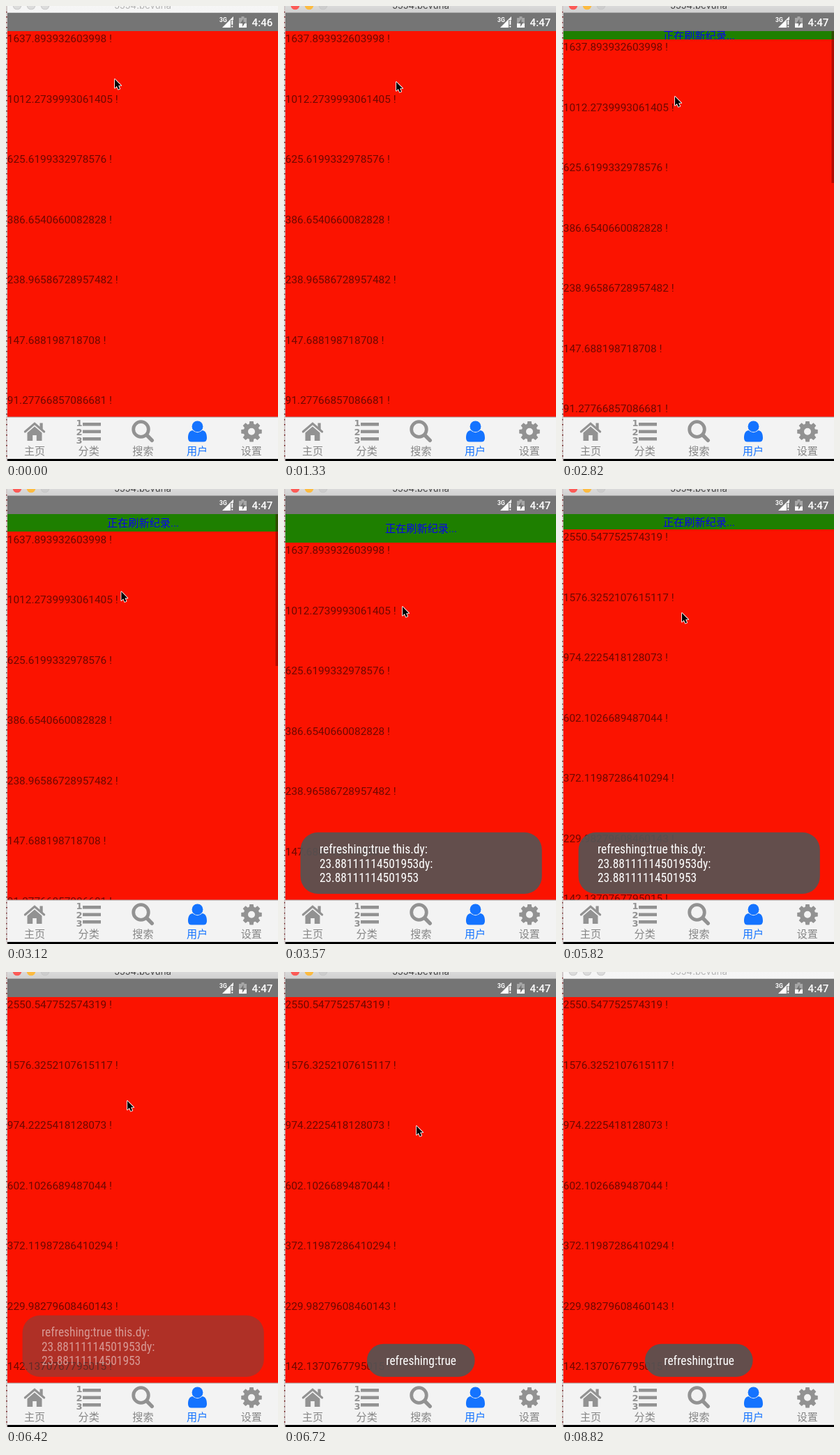
Animation of 390x653 px, one loop 8870 ms. Source, as an HTML page with a canvas:

```html
<!DOCTYPE html>
<html lang="zh">
<head>
<meta charset="utf-8">
<title>Pull to refresh</title>
<style>
html, body { margin: 0; width: 100%; height: 100%; overflow: hidden; background: #fff; }
canvas { display: block; width: 390px; height: 653px; }
</style>
</head>
<body>
<canvas id="stage" width="390" height="653"></canvas>
<script>
const ctx = document.getElementById('stage').getContext('2d');
const LOOP = 8870;
const TOP = 36, BOTTOM = 590, ROW = 86.5;
const RED = '#fb1300', GRAY = '#929292', BLUE = '#1473ff';
const SANS = 'Roboto, sans-serif';
const CJK = '"Noto Sans CJK SC", "Noto Sans CJK", sans-serif';

const oldRows = ['1637.893932603998', '1012.2739993061405', '625.6199332978576',
  '386.6540660082828', '238.96586728957482', '147.688198718708', '91.27766857086681'];
const newRows = ['2550.547752574319', '1576.3252107615117', '974.2225418128073',
  '602.1026689487044', '372.11987286410294', '229.98279608460143', '142.1370767795015'];

// Keys are [step, value, ...], joined by straight lines.
const pointer = [
  [0, 155, 104], [1, 157, 95], [2, 158, 86], [5, 158, 86], [9, 160, 108], [13, 160, 120],
  [17, 160, 123], [19, 161, 129], [22, 166, 155], [24, 169, 168], [26, 171, 177],
  [42, 171, 177], [43, 173, 184], [45, 189, 220], [47, 230, 370], [49, 282, 575],
  [51, 308, 628], [53, 326, 675]
];
const pull = [[15, 0], [17, 3], [19, 12], [22, 32], [24, 41], [36, 41], [39, 22], [41, 5], [42, 0]];

function at(keys, k) {
  if (k <= keys[0][0]) return keys[0].slice(1);
  const i = keys.findIndex(key => key[0] > k);
  if (i < 0) return keys[keys.length - 1].slice(1);
  const a = keys[i - 1], b = keys[i], f = (k - a[0]) / (b[0] - a[0]);
  return a.slice(1).map((v, j) => v + (b[j + 1] - v) * f);
}

// The screen was sampled every 150 ms, with a few slightly short steps.
function stepAt(t) {
  const skip = t < 290 ? 0 : t < 1330 ? 10 : t < 2370 ? 20 : 30;
  return Math.floor((t + skip) / 150);
}

function rect(x, y, w, h, color) {
  ctx.fillStyle = color;
  ctx.fillRect(x, y, w, h);
}

function disc(x, y, r, color) {
  ctx.fillStyle = color;
  ctx.beginPath();
  ctx.arc(x, y, r, 0, Math.PI * 2);
  ctx.fill();
}

function shape(d, color) {
  ctx.fillStyle = color;
  ctx.fill(new Path2D(d));
}

function line(d, width, color, join) {
  ctx.strokeStyle = color;
  ctx.lineWidth = width;
  ctx.lineCap = 'round';
  ctx.lineJoin = join || 'round';
  ctx.stroke(new Path2D(d));
}

function text(s, x, y, font, color, align) {
  ctx.font = font;
  ctx.fillStyle = color;
  ctx.textAlign = align || 'left';
  ctx.fillText(s, x, y);
}

function drawEdge() {
  rect(0, 0, 2, 653, '#d2caca');
  for (let y = 8; y < 650; y += 15) {
    rect(0, y, 1.5, 1.5, '#803838');
    rect(0, y + 7, 2, 1.5, '#803838');
  }
}

function drawTitle(active) {
  const bar = ctx.createLinearGradient(0, 0, 0, 10);
  bar.addColorStop(0, active ? '#dadada' : '#f6f6f6');
  bar.addColorStop(1, active ? '#d0d0d0' : '#f4f4f4');
  rect(2, 0, 388, 10, bar);
  const lights = active ? ['#fc5b57', '#fdbb40', '#cdcdcd'] : ['#dcdcdc', '#dcdcdc', '#dcdcdc'];
  lights.forEach((c, i) => {
    disc(16 + 20 * i, -1, 6.3, active && i < 2 ? c : '#c4c4c4');
    disc(16 + 20 * i, -1, 5.5, c);
  });
  text('5554:bevuna', 196, 4, '13.2px Inter, sans-serif', active ? '#464646' : '#b4b4b4', 'center');
  rect(2, 9, 388, 1, active ? '#aaa' : '#cfcfcf');
}

function drawStatus(clock) {
  rect(2, 10, 388, 26, '#757575');
  text('3G', 306, 23, 'bold 8.5px ' + SANS, '#fff');
  shape('M310 31 L326 15 V20 H322 V31 Z', '#fff');
  rect(323.3, 20.5, 2, 6.5, '#fff');
  rect(323.3, 28.5, 2, 2, '#fff');
  shape('M337.5 15 h4 v2 h3.5 v14 h-11 v-14 h3.5 Z', '#a6a6a6');
  shape('M334 25 h11 v6 h-11 Z', '#fff');
  shape('M340.5 18 L336 25 H339 V30 L343.5 23 H340.5 Z', '#757575');
  text(clock, 382.5, 28.5, '500 15.2px ' + SANS, '#fff', 'right');
}

function drawList(rows, shift, bar) {
  ctx.save();
  ctx.beginPath();
  ctx.rect(2, TOP, 388, BOTTOM - TOP);
  ctx.clip();
  rect(2, TOP, 388, BOTTOM - TOP, RED);
  rows.forEach((s, i) => {
    text(s + ' !', 1.8, 52.3 + shift + i * ROW, '15.4px ' + SANS, '#6e0800');
  });
  if (shift > 0) {
    ctx.beginPath();
    ctx.rect(2, TOP, 388, shift);
    ctx.clip();
    rect(2, TOP, 388, shift, '#1e7f00');
    text('正在刷新纪录...', 196.5, TOP + shift / 2 + 5.8, '15.2px Roboto, ' + CJK, '#0800f0', 'center');
  }
  ctx.restore();
  if (bar) rect(386.5, TOP, 3.5, 218, 'rgba(70,0,0,.4)');
}

function drawToast(lines, x, y, w, h, alpha) {
  ctx.save();
  ctx.globalAlpha = alpha;
  ctx.fillStyle = 'rgba(84,84,84,.91)';
  ctx.beginPath();
  ctx.roundRect(x, y, w, h, 25);
  ctx.fill();
  ctx.fontStretch = 'condensed';
  lines.forEach((s, i) => {
    text(s, x + 27.3, y + 30.3 + i * 20.5, '17.45px "Roboto Condensed", ' + SANS, '#fff');
  });
  ctx.restore();
}

function drawHome(c) {
  line('M27.3 611 L41 599.3 L54.7 611', 3, c, 'miter');
  shape('M48.5 598.5 h4.2 v10 l-4.2 -3.6 Z', c);
  shape('M30.5 612.6 L41 603.6 L51.5 612.6 V624 H43.8 V616 H38.2 V624 H30.5 Z', c);
}

function drawNumbers(c) {
  for (let i = 0; i < 3; i++) {
    rect(110, 598 + 10.5 * i, 26, 4.6, c);
    text(i + 1, 105, 603.3 + 12.3 * i, 'bold 13px "DejaVu Sans", sans-serif', c, 'center');
  }
}

function drawSearch(c) {
  ctx.strokeStyle = c;
  ctx.lineWidth = 4.8;
  ctx.beginPath();
  ctx.arc(193.5, 607.5, 10.8, 0, Math.PI * 2);
  ctx.stroke();
  line('M202 616 L209.3 623.3', 5.4, c);
}

function drawUser(c) {
  shape('M267.5 609 C262.5 609.5 261 614.5 261 620 Q261 625.6 266 625.6 H283 Q288 625.6 288 620 ' +
    'C288 614.5 286.5 609.5 281.5 609 Q274.5 615.5 267.5 609 Z', c);
  disc(274.5, 603.4, 7.9, c);
}

function drawGear(c) {
  const p = new Path2D();
  for (let i = 0; i < 8; i++) {
    const a = i * Math.PI / 4;
    [[-0.29, 11.4], [-0.18, 15], [0.18, 15], [0.29, 11.4]].forEach(([d, r]) => {
      p.lineTo(352 + r * Math.cos(a + d), 610.7 + r * Math.sin(a + d));
    });
  }
  p.closePath();
  p.moveTo(357, 610.7);
  p.arc(352, 610.7, 5, 0, Math.PI * 2);
  ctx.fillStyle = c;
  ctx.fill(p, 'evenodd');
}

const tabs = [['主页', drawHome], ['分类', drawNumbers], ['搜索', drawSearch],
  ['用户', drawUser], ['设置', drawGear]];

function drawTabs() {
  rect(2, BOTTOM, 388, 60, '#f3f3f3');
  rect(2, BOTTOM - 0.5, 388, 1, '#a9a9a9');
  rect(2, 650, 388, 3, '#000');
  tabs.forEach(([name, icon], i) => {
    const color = i === 3 ? BLUE : GRAY;
    icon(color);
    text(name, 41 + 77.7 * i, 643.8, '15.1px ' + CJK, i === 3 ? BLUE : '#878787', 'center');
  });
}

function drawPointer([x, y]) {
  ctx.save();
  ctx.translate(x + 0.5, y + 0.5);
  ctx.scale(0.88, 0.88);
  const arrow = 'M0.6 0.6 V15 L3.8 12 L6.1 17.2 L8.7 16.1 L6.4 11 H10.8 Z';
  line(arrow, 2, '#fff');
  shape(arrow, '#000');
  ctx.restore();
}

function draw(t) {
  const k = stepAt(t);
  drawEdge();
  drawTitle(k >= 4 && k < 59);
  drawStatus(k < 8 ? '4:46' : '4:47');
  drawList(k < 36 ? oldRows : newRows, at(pull, k)[0], k >= 16 && k < 22);
  drawTabs();
  if (k >= 22 && k < 44) {
    drawToast(['refreshing:true this.dy:', '23.88111114501953dy:', '23.88111114501953'],
      23.6, 492.8, 346.2, 88.2, k === 22 || k === 43 ? 0.5 : 1);
  } else if (k >= 44) {
    drawToast(['refreshing:true'], 119, 533.8, 154.6, 47.2, k === 44 ? 0.5 : 1);
  }
  drawPointer(at(pointer, k));
}

const start = performance.now();
function tick() {
  draw((performance.now() - start) % LOOP);
  requestAnimationFrame(tick);
}
tick();
</script>
</body>
</html>
```
